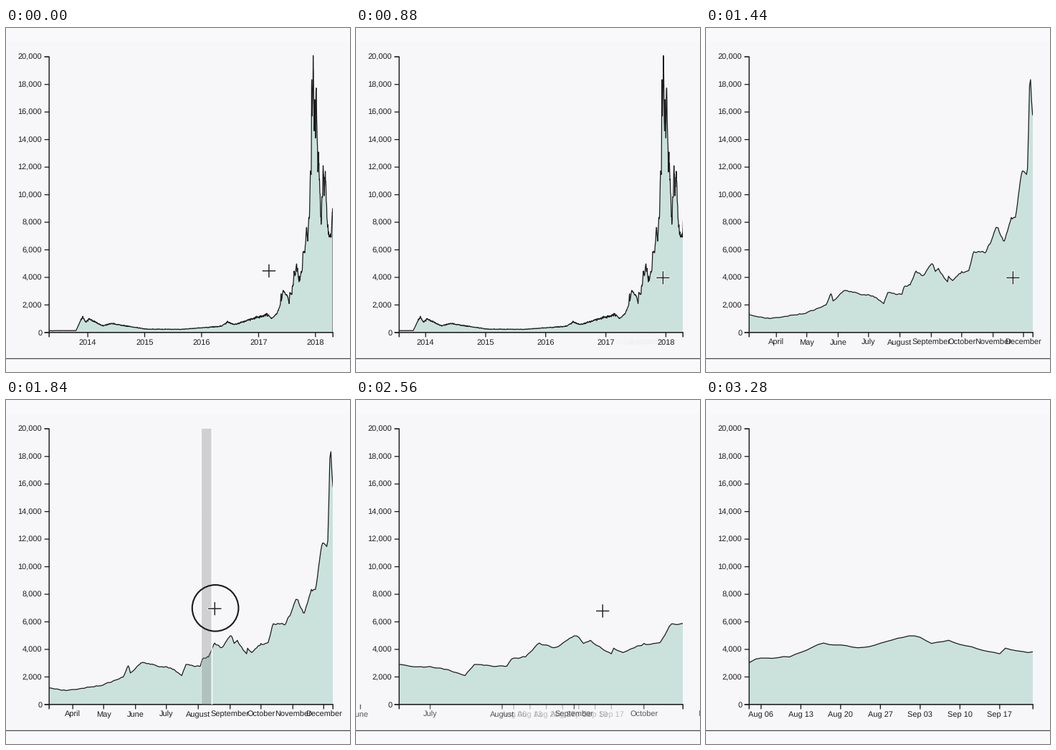
These frames come from a looping animation (480 px wide and 480 px high, 3.36 s). A matplotlib script:

```python
import numpy as np
import matplotlib.pyplot as plt
from matplotlib.animation import FuncAnimation
from matplotlib.patches import Circle, Polygon, Rectangle

SIZE, DPI, STEP, FRAMES = 480, 100, 80, 42
PX = 72 / DPI                       # points per pixel
X0, X1, Y0, YTOP = 60.2, 456.2, 424.9, 40.3
BG, PALE, INK, FILL = "#f7f7fa", "#f9f9fb", "#1c1c1c", "#cbe2dc"

# turning points of the price: (days since 2017-01-01, value)
TURNS = [
    (-1344, 135), (-1172, 140), (-1128, 1180), (-1109, 740), (-1090, 1000),
    (-1000, 480), (-945, 660), (-717, 240), (-485, 235), (-240, 455),
    (-200, 760), (-152, 580), (4, 1150), (61, 1290), (83, 1010), (118, 1380),
    (139, 2000), (144, 2810), (146, 2290), (156, 3010), (186, 2620),
    (196, 2100), (200, 2900), (214, 2780), (216, 3290), (222, 3450),
    (228, 4460), (234, 4120), (244, 4980), (247, 4430), (250, 4660),
    (259, 3680), (260, 4090), (264, 3770), (273, 4430), (280, 4500),
    (285, 5860), (297, 5850), (308, 7620), (315, 6630), (322, 8350),
    (326, 8350), (332, 11500), (338, 11900), (340, 17900), (341, 18350),
    (343, 15800), (350, 20089), (357, 14630), (360, 16900), (365, 14110),
    (369, 17705), (381, 11680), (384, 13100), (401, 7850), (415, 11950),
    (420, 9920), (428, 11700), (438, 8400), (455, 7060), (465, 6910),
    (477, 9010),
]


def build_series():
    turns = np.array(TURNS, float)
    days = np.arange(turns[0, 0], turns[-1, 0] + 1)
    noise = np.random.default_rng(7).normal(0, 1, days.size)
    noise = np.convolve(noise, [0.5, 0.7, 0.5], "same")
    noise *= np.where(days < 61, 0.035, np.where(days < 343, 0.012, 0.03))
    noise[np.isin(days, turns[:, 0])] = 0
    return days, np.interp(days, *turns.T) * (1 + noise)


def month_ticks():
    names = ["April", "May", "June", "July", "August", "September",
             "October", "November", "December"]
    starts = 90 + np.cumsum([0, 30, 31, 30, 31, 31, 30, 31, 30])
    return list(zip(starts, names))


def week_ticks():
    return [(217 + 7 * i, f"Aug {6 + 7 * i:02d}" if i < 4 else f"Sep {7 * i - 25:02d}")
            for i in range(7)]


YEARS = [(365 * (y - 2017) - (y <= 2016), str(y)) for y in range(2014, 2019)]
DAYS, PRICE = build_series()
VIEWS = [(-1344, 477), (67, 343), (214.9, 264.85)]
TICKS = [YEARS, month_ticks(), week_ticks()]
ZOOMS = [772, 2231]                 # start times
ZOOM_MS = 800
DRAGS = [(100, 772, 367.2), (1660, 2231, 272.8)]   # press, release, anchor
LAG = 28
HIDE = 2880
# start, end, from, to
MOVES = [(100, 693, (366.9, 338.9), (428.4, 348.5)),
         (1440, 1650, (428.4, 348.5), (272.8, 290)),
         (1660, 2200, (272.8, 290), (344.2, 294.4))]


def to_x(view, day):
    a, b = VIEWS[view]
    return X0 + (np.asarray(day, float) - a) * (X1 - X0) / (b - a)


def to_y(v):
    return Y0 - np.asarray(v, float) * (Y0 - YTOP) / 20000


def cubic(t):
    t = min(max(t, 0), 1)
    return 4 * t ** 3 if t < 0.5 else 1 - 4 * (1 - t) ** 3


def cursor_at(ms):
    pos = np.array(MOVES[0][2])
    for start, end, a, b in MOVES:
        if ms >= start:
            u = min((ms - start) / (end - start), 1)
            pos = np.array(a) + (np.array(b) - np.array(a)) * u * u * (3 - 2 * u)
    return pos


def zoom_at(ms):
    k = int(ms >= ZOOMS[1])
    return k, k + 1, cubic((ms - ZOOMS[k]) / ZOOM_MS)


plt.rcParams.update({"font.family": "Liberation Sans", "text.hinting": "none",
                     "text.hinting_factor": 1})
fig = plt.figure(figsize=(SIZE / DPI, SIZE / DPI), dpi=DPI, facecolor=BG)
ax = fig.add_axes([0, 0, 1, 1])
ax.set_xlim(0, SIZE)
ax.set_ylim(SIZE, 0)
ax.axis("off")


def line(xs, ys, width=1.3, color=INK, z=4):
    return ax.plot(xs, ys, color=color, lw=width * PX, zorder=z, snap=False,
                   solid_capstyle="butt", solid_joinstyle="miter")[0]


def label(x, y, s, ha):
    return ax.text(x, y, s, ha=ha, va="baseline", size=10.9 * PX, color=INK, zorder=5)


for top, height in ((0, 19), (461, 19)):
    ax.add_patch(Rectangle((0, top), SIZE, height, fc=PALE, lw=0, zorder=0))
line([0, SIZE], [461.4, 461.4], 1.2, "#444444")

area = Polygon([(0, 0), (1, 1), (1, 0)], closed=True, fc=FILL, ec=INK, lw=1.25 * PX,
               zorder=2, joinstyle="round", snap=False)
ax.add_patch(area)
area.set_clip_path(Rectangle((X0, 30), X1 - X0, Y0 - 30, transform=ax.transData))

line([X0 - 6.5, X0, X0, X0 - 6.5], [YTOP, YTOP, Y0, Y0], 1.45)
line([X0, X0, X1, X1], [Y0 + 6.5, Y0, Y0, Y0 + 6.5], 1.45)
for v in range(0, 20001, 2000):
    y = float(to_y(v))
    line([X0 - 6.5, X0], [y, y])
    label(X0 - 10, y + 3.7, f"{v:,}", "right")

marks = [[(d, line([0, 0], [Y0, Y0 + 6.5]), label(0, 442.2, s, "center"))
          for d, s in group] for group in TICKS]

brush = Rectangle((0, YTOP - 0.8), 1, Y0 - YTOP + 0.8, fc="#777777", alpha=0.3, lw=0, zorder=6)
ax.add_patch(brush)
edge_a = line([0, 0], [YTOP, Y0], 1, "white", 6)
edge_a.set(alpha=0.6, linestyle=(0, (2, 1.5)))
edge_b = line([0, 0], [YTOP, Y0], 1.6, "white", 6)
ring = Circle((0, 0), 32.3, fill=False, ec=INK, lw=2.1 * PX, zorder=8)
ax.add_patch(ring)
cross = [line([0, 0], [0, 0], w, c, z)
         for w, c, z in ((3.2, "white", 9), (1.5, "#222222", 10)) for _ in "hv"]


def draw(i):
    ms = i * STEP
    a, b, e = zoom_at(ms)
    xs = (1 - e) * to_x(a, DAYS) + e * to_x(b, DAYS)
    area.set_xy(np.column_stack([np.r_[xs, xs[-1], xs[0]],
                                 np.r_[to_y(PRICE), Y0, Y0]]))

    alpha = {a: 1 - e, b: e}
    for view, group in enumerate(marks):
        opacity = alpha.get(view, 0)
        for day, tick, text in group:
            x = float((1 - e) * to_x(a, day) + e * to_x(b, day))
            tick.set_xdata([x, x])
            text.set_x(x)
            for art in (tick, text):
                art.set_alpha(opacity)
                art.set_visible(opacity > 0.005 and -40 < x < SIZE + 40)

    cx, cy = cursor_at(ms)
    drag = next((d for d in DRAGS if d[0] <= ms < d[1]), None)
    for art in (brush, edge_a, edge_b, ring):
        art.set_visible(drag is not None)
    if drag:
        left = drag[2]
        right = max(left, cursor_at(max(ms - LAG, drag[0]))[0])
        brush.set_x(left)
        brush.set_width(right - left)
        edge_a.set_xdata([left, left])
        edge_b.set_xdata([right + 0.8] * 2)
        ring.center = (cx + 0.8, cy - 0.8)

    for k, arm in enumerate(cross):
        r = 10 if k < 2 else 9.2
        dx, dy = (r, 0) if k % 2 == 0 else (0, r)
        arm.set_data([cx - dx, cx + dx], [cy - dy, cy + dy])
        arm.set_visible(ms < HIDE)
    return []


anim = FuncAnimation(fig, draw, frames=FRAMES, interval=STEP, repeat=True,
                     repeat_delay=0, blit=False)
plt.show()
```
